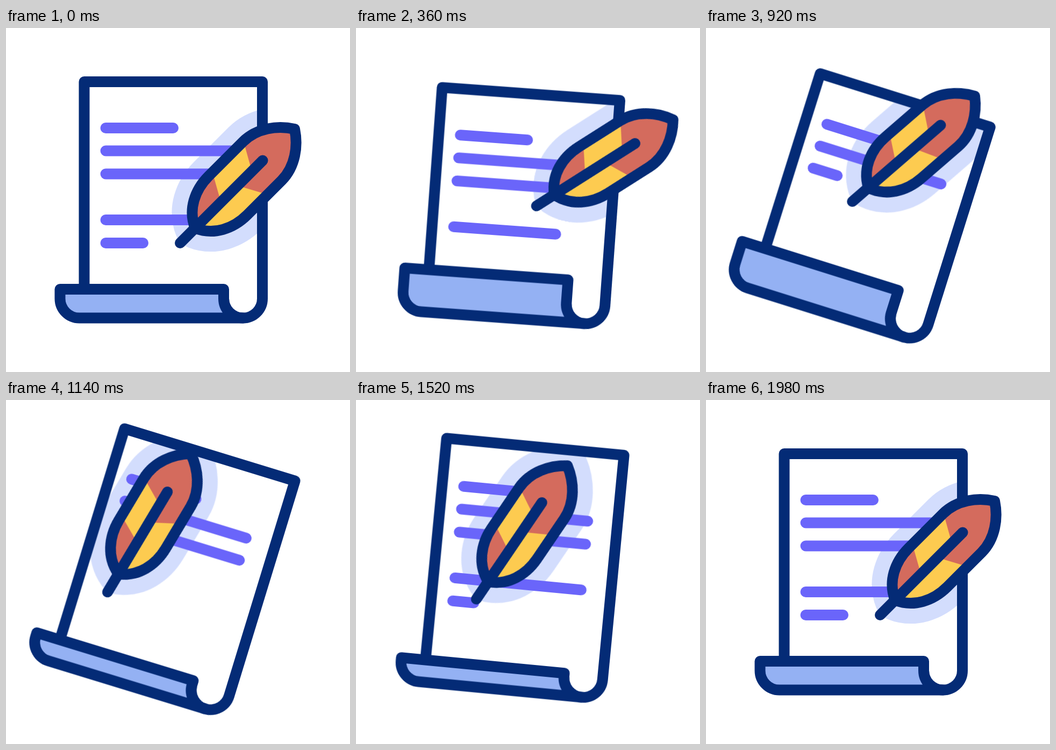
An HTML page without scripts that plays this animation: 640 px wide and 640 px high, repeating every 2400 ms.

```html
<!DOCTYPE html>
<html lang="en">
<head>
<meta charset="utf-8">
<title>Scroll and quill</title>
<style>
  html, body { margin: 0; width: 100%; height: 100%; overflow: hidden; background: #fff; }
  svg { display: block; width: 100%; height: 100%; }

  svg * { animation: 2.4s cubic-bezier(.6, 0, .3, 1) infinite; }

  .ink { fill: none; stroke: #042b76; stroke-width: 20; stroke-linecap: round; stroke-linejoin: round; }
  .lines { fill: none; stroke: #6a65fa; stroke-width: 20; stroke-linecap: round; }
  .halo { fill: #d3ddfd; stroke: #d3ddfd; stroke-width: 76; stroke-linejoin: round; }

  /* --k: 1 applies a move, -1 undoes it */
  .turn { --k: 1; transform-origin: 288.5px 320px; animation-name: turn; }
  .slide { --k: 1; animation-name: slide; }
  .undo { --k: -1; }
  .sheet { animation-name: sheet; }
  .flap { fill: #94b1f3; animation-name: flap; }
  .quill { transform-origin: 324px 400px; animation-name: quill; }

  .wipe { stroke-dasharray: 100 200; }
  .l3 { animation-name: l3; }
  .l4 { animation-name: l4; }
  .l5 { animation-name: l5; }

  @keyframes turn {
    0% { transform: rotate(0deg); animation-timing-function: cubic-bezier(.62, 0, .28, 1); }
    41.25% { transform: rotate(calc(var(--k) * 17.5deg)); }
    82.5%, 100% { transform: rotate(0deg); }
  }
  @keyframes slide {
    0% { transform: translateY(0); animation-timing-function: cubic-bezier(.6, 0, .45, 1); }
    27.5% { transform: translateY(calc(var(--k) * 36px)); }
    55% { transform: translateY(calc(var(--k) * -19px)); }
    82.5%, 100% { transform: translateY(0); }
  }
  @keyframes sheet {
    0% {
      d: path("M145.5 486V100H477V503.5A36 36 0 0 1 405 503.5");
      animation-timing-function: cubic-bezier(.6, 0, .45, 1);
    }
    27.5% { d: path("M145.5 441V136H477V503.5A36 36 0 0 1 405 503.5"); }
    55% { d: path("M145.5 500V81H477V503.5A36 36 0 0 1 405 503.5"); }
    82.5%, 100% { d: path("M145.5 486V100H477V503.5A36 36 0 0 1 405 503.5"); }
  }
  @keyframes flap {
    0% {
      d: path("M405 503.5V486H100.5V503.5A36 36 0 0 0 136.5 539.5H441A36 36 0 0 1 405 503.5Z");
      animation-timing-function: cubic-bezier(.6, 0, .45, 1);
    }
    27.5% { d: path("M405 503.5V441H100.5V503.5A36 36 0 0 0 136.5 539.5H441A36 36 0 0 1 405 503.5Z"); }
    55% { d: path("M405 503.5V500H100.5V503.5A36 36 0 0 0 136.5 539.5H441A36 36 0 0 1 405 503.5Z"); }
    82.5%, 100% { d: path("M405 503.5V486H100.5V503.5A36 36 0 0 0 136.5 539.5H441A36 36 0 0 1 405 503.5Z"); }
  }
  @keyframes quill {
    0% { transform: translate(0, 0) rotate(0deg); animation-timing-function: cubic-bezier(.6, 0, .35, 1); }
    27.8% { transform: translate(18px, -106px) rotate(19.4deg); }
    51.67% { transform: translate(-139px, -41px) rotate(-15deg); }
    82.5%, 100% { transform: translate(0, 0) rotate(0deg); }
  }
  @keyframes l3 {
    0%, 19.3% { stroke-dashoffset: 0; }
    33.2%, 33.6% { stroke-dashoffset: 101; }
    47.5%, 100% { stroke-dashoffset: 0; }
  }
  @keyframes l4 {
    0%, 10.4% { stroke-dashoffset: 0; }
    24.3%, 49.2% { stroke-dashoffset: 101; }
    63.1%, 100% { stroke-dashoffset: 0; }
  }
  @keyframes l5 {
    0% { stroke-dashoffset: 0; }
    13.9%, 58.3% { stroke-dashoffset: 101; }
    68.7%, 100% { stroke-dashoffset: 0; }
  }
</style>
</head>
<body>
<svg viewBox="0 0 640 640">
  <defs>
    <clipPath id="page"><path d="M145.5 100H477V540H145.5Z"/></clipPath>
    <path id="vane" d="M352 372.5C338.5 338 351 301.5 377 275.5L441 211.5C467 186 505 181 537 188C543.5 219.5 538.5 257.5 513 283.5L449 347.5C423 373.5 386.5 386 352 372.5Z"/>
  </defs>

  <g class="turn">
    <g class="slide">
      <g clip-path="url(#page)">
        <g class="slide undo"><g class="turn undo">
          <g class="quill"><use href="#vane" class="halo"/></g>
        </g></g>
      </g>
      <g class="lines">
        <path d="M185.5 186h125.5M185.5 228.5h236"/>
        <path class="wipe l3" pathLength="100" d="M185.5 271.5h236"/>
        <path class="wipe l4" pathLength="100" d="M185.5 357h236"/>
        <path class="wipe l5" pathLength="100" d="M185.5 400h69.5"/>
      </g>
    </g>
    <path class="ink sheet" d="M145.5 486V100H477V503.5A36 36 0 0 1 405 503.5"/>
    <path class="ink flap" style="fill:#94b1f3" d="M405 503.5V486H100.5V503.5A36 36 0 0 0 136.5 539.5H441A36 36 0 0 1 405 503.5Z"/>
  </g>

  <g class="quill">
    <use href="#vane" fill="#d46b5d"/>
    <path fill="#fdcb50" d="M384 268L442 211L457.5 267L430 293L487 310L449 347.5C423 373.5 386.5 386 352 372.5L400 324.5Z"/>
    <use href="#vane" class="ink"/>
    <path class="ink" d="M324 400L477.5 246.5"/>
  </g>
</svg>
</body>
</html>
```
